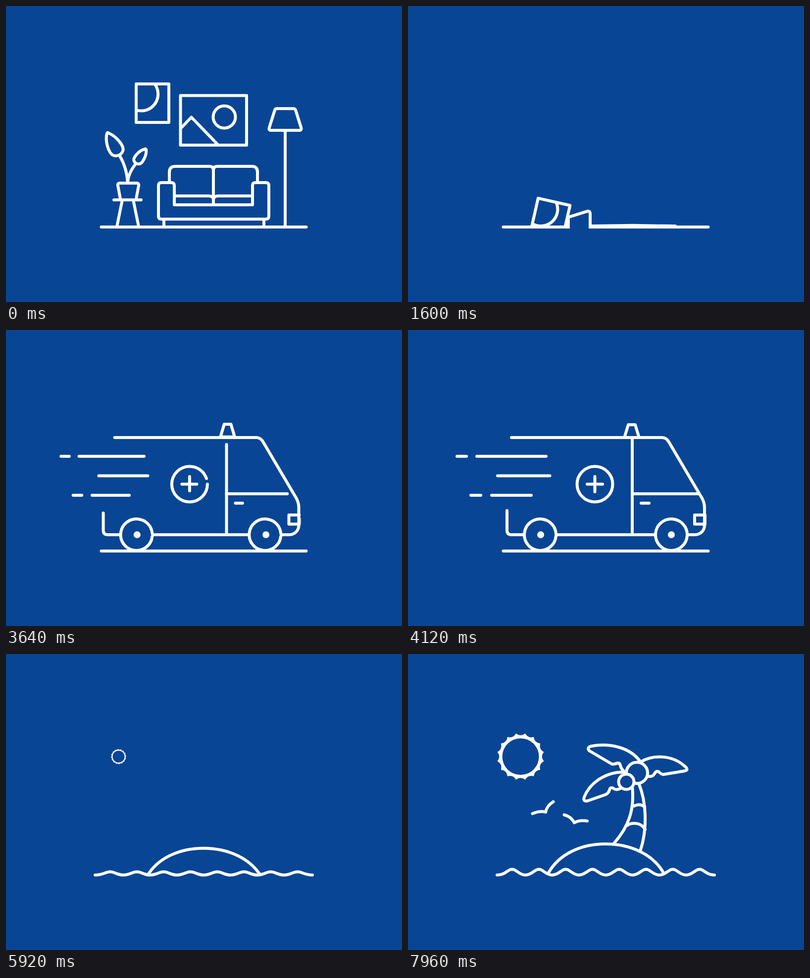
An HTML page that plays this animation: 800 px wide and 600 px high, repeating every 8 s.

```html
<!DOCTYPE html>
<html lang="en">
<head>
<meta charset="utf-8">
<title>Line scenes</title>
<style>
html, body { margin: 0; width: 100%; height: 100%; overflow: hidden; background: #084594; }
svg { display: block; width: 100%; height: 100%; }
</style>
</head>
<body>
<svg id="stage" viewBox="0 0 800 600" fill="none" stroke="#fff" stroke-width="6" stroke-linecap="round" stroke-linejoin="round">
  <clipPath id="above"><path id="aboveShape" transform="translate(0 3)"/></clipPath>
</svg>
<script>
const BG = '#084594', LOOP = 8000, FLOOR = 448;
const stage = document.getElementById('stage');
const aboveShape = document.getElementById('aboveShape');

function add(parent, tag, attrs = {}) {
  const el = document.createElementNS('http://www.w3.org/2000/svg', tag);
  for (const key in attrs) el.setAttribute(key, attrs[key]);
  return parent.appendChild(el);
}
const group = (parent, attrs) => add(parent, 'g', attrs);
const line = (parent, d, attrs) => add(parent, 'path', { d, ...attrs });
const circle = (parent, cx, cy, r, attrs) => add(parent, 'circle', { cx, cy, r, ...attrs });
const set = (el, name, value) => el.setAttribute(name, value);
const show = (el, on) => set(el, 'visibility', on ? 'inherit' : 'hidden');
const clamp = v => Math.max(0, Math.min(1, v));
const span = (t, from, to) => clamp((t - from) / (to - from));
const mix = (a, b, k) => a + (b - a) * k;
const easeOut = u => 1 - (1 - u) ** 4;
const easeInOut = u => u < .5 ? 4 * u ** 3 : 1 - (2 - 2 * u) ** 3 / 2;
const backOut = u => 1 + 2.4 * (u - 1) ** 3 + 1.4 * (u - 1) ** 2;

function trim(el, k) {
  show(el, k > 0);
  set(el, 'pathLength', 1);
  set(el, 'stroke-dasharray', k > .995 ? 'none' : k + ' 2');
}

// Living room
const room = group(stage, { 'clip-path': 'url(#above)' });

const plant = group(room);
line(plant, 'M206 257C222 263 240 284 236 294C232 305 216 308 210 296C203 284 201 268 204 258Q205 256 206 257Z');
line(plant, 'M281 290C270 292 255 307 259 315C263 322 272 322 276 315C282 306 284 298 283 291Q282 289 281 290Z');
line(plant, 'M230 304Q244 328 246 359M262 320Q246 340 246 359');
line(plant, 'M231 391L226 364Q225 359 230 359H264Q269 359 268 364L263 391');
line(plant, 'M218 393H273M235 393L224 447M257 393L268 447');

const sofa = group(room);
line(sofa, 'M330 358V337Q330 325 342 325H411Q419 325 419 333V403M419 333Q419 325 427 325H497Q508 325 508 337V358');
line(sofa, 'M341 385H409Q419 385 419 393Q419 385 429 385H497');
line(sofa, 'M340 403H498V364Q498 358 504 358H525Q531 358 531 364V426Q531 432 525 432H314Q308 432 308 426V364Q308 358 314 358H334Q340 358 340 364Z');
line(sofa, 'M319 432V447M521 432V447');

const lamp = group(room);
line(lamp, 'M547 208H580Q584 208 585 211L596 246Q598 252 592 252H536Q530 252 532 246L543 211Q544 208 547 208ZM564 252V447');

const bigPicture = group(room);
line(bigPicture, 'M352.5 181.5H486V282H352.5ZM353 248L374.5 225.5L428 281');
circle(bigPicture, 441, 225, 22.5);

const smallPicture = group(room);
line(smallPicture, 'M263 158H329V236H263ZM301 159A34 34 0 0 1 263 211');

// start, time to fall 238 px, turn, sideways drift, centre
const falls = [
  [sofa, 820, 440, 0, 0, 419, 380],
  [plant, 900, 420, 0, 0, 246, 350],
  [lamp, 960, 420, 0, 0, 564, 330],
  [bigPicture, 1120, 340, -8, 6, 419, 232],
  [smallPicture, 1280, 320, 12.8, -9.5, 296, 197]
];

function drawRoom(t) {
  show(room, t < 1720);
  for (const [el, start, time, turn, drift, cx, cy] of falls) {
    const u = t < 840 ? 0 : Math.max(0, (t - start) / time) ** 2;
    set(el, 'transform', `translate(${drift * u} ${238 * u}) rotate(${turn * u} ${cx} ${cy})`);
  }
}

// Ambulance
const vanClip = group(stage, { 'clip-path': 'url(#above)' });
const van = group(vanClip);
const parts = [];

// A part slides in from its shift while its line is drawn
function part(d, shift, start, power = 1, attrs) {
  parts.push({ el: line(van, d, attrs), shift, start, power });
}
part('M566 415H580A19 19 0 0 0 599 396V360Q599 350 594 341L527 227Q522 218 513 218H209', -184, 3195, 1.15);
part('M300 415H500', -85, 3195, 1, { 'stroke-linecap': 'butt' });
part('M235 415H209Q200 415 200 406V366', -85, 3290);
part('M453 415V218', -184, 3310);
part('M453 332H587', -184, 3330);
part('M471 351H487', -184, 3360);
part('M600 375H579V393.5H600Z', -184, 3340);
part('M362 312.5H393', -163, 3195);
part('M377.5 297V328', -163, 3300);
part('M413.5 312.5A36 36 0 1 1 341.5 312.5A36 36 0 1 1 413.5 312.5', -163, 3270);

for (const [x, shift, hubX, hubShift] of [[267, -85, 268, -78], [532, -214, 532, -169]]) {
  parts.push({ el: circle(van, x, 415, 32), shift, start: 3195, power: 1, turn: `rotate(6 ${x} 415)` });
  parts.push({ el: circle(van, hubX, 415, 7, { fill: '#fff', stroke: 'none' }), shift: hubShift, start: 3220, fade: true });
}
const siren = line(van, '');

// y, right end, left end, then the loose dash beyond it
const speedLines = [
  [256, 279, 139, 118, 99],
  [295.5, 286.5, 181, 0, 0],
  [335, 249, 169, 147, 127]
].map(data => ({ data, el: line(van, '') }));

const drawn = (t, start) => {
  const k = 1 - Math.exp(-(t - start) / 125);
  return k > .995 ? 1 : Math.max(0, k);
};

function drawVan(t) {
  show(vanClip, t > 3180 && t < 5840);
  const slide = t > 4110 ? 0 : Math.exp(-(Math.max(t, 3160) - 3240) / 125);
  for (const { el, shift, start, power, turn, fade } of parts) {
    const k = drawn(t, start);
    set(el, 'transform', `translate(${shift * slide} 0) ${turn || ''}`);
    if (fade) set(el, 'opacity', k);
    else trim(el, k ** power);
  }

  const g = drawn(t, 3235);
  const top = 192 + (1 - g) * 2, foot = top + mix(3, 25, g);
  show(siren, g > 0);
  set(siren, 'd', `M${452 - 14.5 * g} ${foot}L${452 - 7 * g} ${top}H${452 + 7 * g}L${452 + 14.5 * g} ${foot}M${452 - 15 * g} 218H${452 + 15 * g}`);
  set(siren, 'transform', `translate(${-108 * slide} ${-28 * slide})`);

  const sink = Math.max(0, (t - 5000) / 360) ** 2;
  const k = drawn(t, 3290) - .45 * sink;
  for (const { data: [y, right, left, dashRight, dashLeft], el } of speedLines) {
    show(el, k > .02);
    let d = `M${right} ${y}H${right - (right - left) * k}`;
    if (dashRight && k > .5) {
      const x = right - (right - dashRight) * k;
      d += `M${x} ${y}H${x - (dashRight - dashLeft) * (k - .5) * 2}`;
    }
    set(el, 'd', d);
  }
  set(van, 'transform', `translate(0 ${52 * sink})`);
}

// Island
const islandClip = group(stage, { 'clip-path': 'url(#above)' });
const island = group(islandClip);
line(island, 'M283 445C305 405 350 385 399 385C448 385 495 405 517 445');
const trunk = [
  'M416 384C446 350 458 315 453 268',
  'M469 400C484 355 482 300 466 262',
  'M442 348C450 342 470 339 479 356',
  'M457 308Q468 302 478 310'
].map(d => line(island, d));
const fronds = [
  'M470 219C448 188 406 180 369 187Q361 190 366 196L410 222Q413 224 417 223L424 221Q428 221 429 226Q431 234 437 238',
  'M470 219C490 206 531 201 561 229Q567 235 559 237L517 244Q513 245 508 240Q503 235 499 241L497 244Q494 249 485 248',
  'M440 240C410 236 370 255 356 290Q353 299 362 298L399 285Q404 283 406 278L408 273Q411 269 416 273Q421 277 430 272'
].map(d => line(island, d));
const nuts = [
  [462.5, 241, 21.5],
  [441, 259, 15.5]
].map(([x, y, r]) => ({ r, el: circle(island, x, y, r, { fill: BG }) }));

const polar = (r, deg) => {
  const a = deg * Math.PI / 180;
  return `${r * Math.sin(a)} ${-r * Math.cos(a)}`;
};
let rays = 'M' + polar(47, -11.25);
for (let i = 0; i < 16; i++) rays += `Q${polar(39, i * 22.5)} ${polar(47, i * 22.5 + 11.25)}`;
const sun = group(stage);
line(sun, rays + 'Z', { fill: '#fff', 'stroke-width': 1.2 });
circle(sun, 0, 0, 37, { fill: BG, stroke: 'none' });

const birds = [
  'M251.5 323.5Q267 317 278 320.5Q280 308 293.5 299.5',
  'M315.5 326Q329 329 336 342Q346 336 362 338.5'
].map(d => line(stage, d));

function drawIsland(t) {
  show(islandClip, t > 5700);
  set(island, 'transform', `translate(0 ${75 * (1 - easeOut(span(t, 5720, 6200)))})`);
  trunk.forEach((el, i) => trim(el, easeOut(span(t, 5980 + i * 50, 6380 + i * 50))));
  fronds.forEach((el, i) => {
    const k = easeOut(span(t, 6200 + i * 50, 6620 + i * 30));
    show(el, k > .02);
    set(el, 'transform', `translate(462 241) rotate(${(1 - k) * (i === 1 ? 50 : -50)}) scale(${k}) translate(-462 -241)`);
  });
  nuts.forEach(({ el, r }, i) => {
    const k = backOut(span(t, 6380 + i * 40, 6730 + i * 40));
    show(el, k > .02);
    set(el, 'r', r * Math.max(0, k));
  });
  const s = easeOut(span(t, 5860, 6500));
  show(sun, s > .01);
  set(sun, 'transform', `translate(227.5 208) rotate(${-90 * (1 - s)}) scale(${s})`);
  birds.forEach((el, i) => trim(el, easeOut(span(t, 6200 + i * 80, 6640 + i * 80))));
}

// Ground line, which turns into waves
const ground = line(stage, '');

function drawGround(t) {
  const k = easeInOut(span(t, 5000, 5360));
  const height = k * (10 + 4.5 * Math.cos((t - 5360) / 1440 * 2 * Math.PI));
  const wide = mix(414 / 439, 1, k);
  const pt = (x, up) => `${399.5 + (x - 399.5) * wide} ${FLOOR - height * up} `;
  const start = pt(180, 0);
  let d = '';
  for (let i = 0; i < 8; i++) {
    const x = 210.3 + i * 54.1;
    const left = i ? x - 27 : 180, right = i < 7 ? x + 27 : 619;
    d += (i ? '' : 'L' + pt(left, 0)) +
      'C' + pt(x - 17, 0) + pt(x - 12, .59) + pt(x - 5, .9) +
      'Q' + pt(x, 1.1) + pt(x + 5, .9) +
      'C' + pt(x + 12, .59) + pt(x + 17, 0) + pt(right, 0);
  }
  set(ground, 'd', 'M' + start + d);
  set(aboveShape, 'd', `M0 0V${FLOOR}L${start}${d}L800 ${FLOOR}V0Z`);
}

// House
const house = group(stage, { 'clip-path': 'url(#above)', fill: BG });
const mainWall = line(house, '');
const details = line(house, '');
const porch = line(house, '');

function drawHouse(t) {
  const fold = 1 - easeInOut(span(t, 2320, 2800));
  const a = easeOut(span(t, 1540, 2240)) * fold;
  const b = easeOut(span(t, 1597, 2297)) * fold;
  show(house, a > .005);
  const X = x => 324 + (x - 324) * fold;
  const Y = h => FLOOR - h * b;

  set(mainWall, 'd', `M${X(368)} ${FLOOR}V${Y(112)}L${X(454)} ${Y(189)}L${X(540)} ${Y(112)}V${FLOOR}Z`);
  show(details, b > .35);
  set(details, 'd', `M${X(398)} ${FLOOR}V${Y(72)}H${X(434)}V${FLOOR}M${X(468)} ${Y(78)}H${X(510)}V${Y(38)}H${X(468)}ZM${X(489)} ${Y(78)}V${Y(38)}`);

  const left = X(mix(344, 277, a)), right = X(368);
  const low = FLOOR - 66 * a, high = FLOOR - 108 * a;
  const bend = Math.min(6, (right - left) / 3);
  const slope = (low - high) / Math.max(1, right - left);
  set(porch, 'd', `M${left} 470V${low}L${right - bend} ${high + slope * bend - 1}Q${right} ${high - 1} ${right} ${high + bend}V470`);
}

function draw(t) {
  drawGround(t);
  drawRoom(t);
  drawHouse(t);
  drawVan(t);
  drawIsland(t);
}

let began = null;
function tick(now) {
  if (began === null) began = now;
  draw((now - began) % LOOP);
  requestAnimationFrame(tick);
}
draw(0);
requestAnimationFrame(tick);
</script>
</body>
</html>
```
